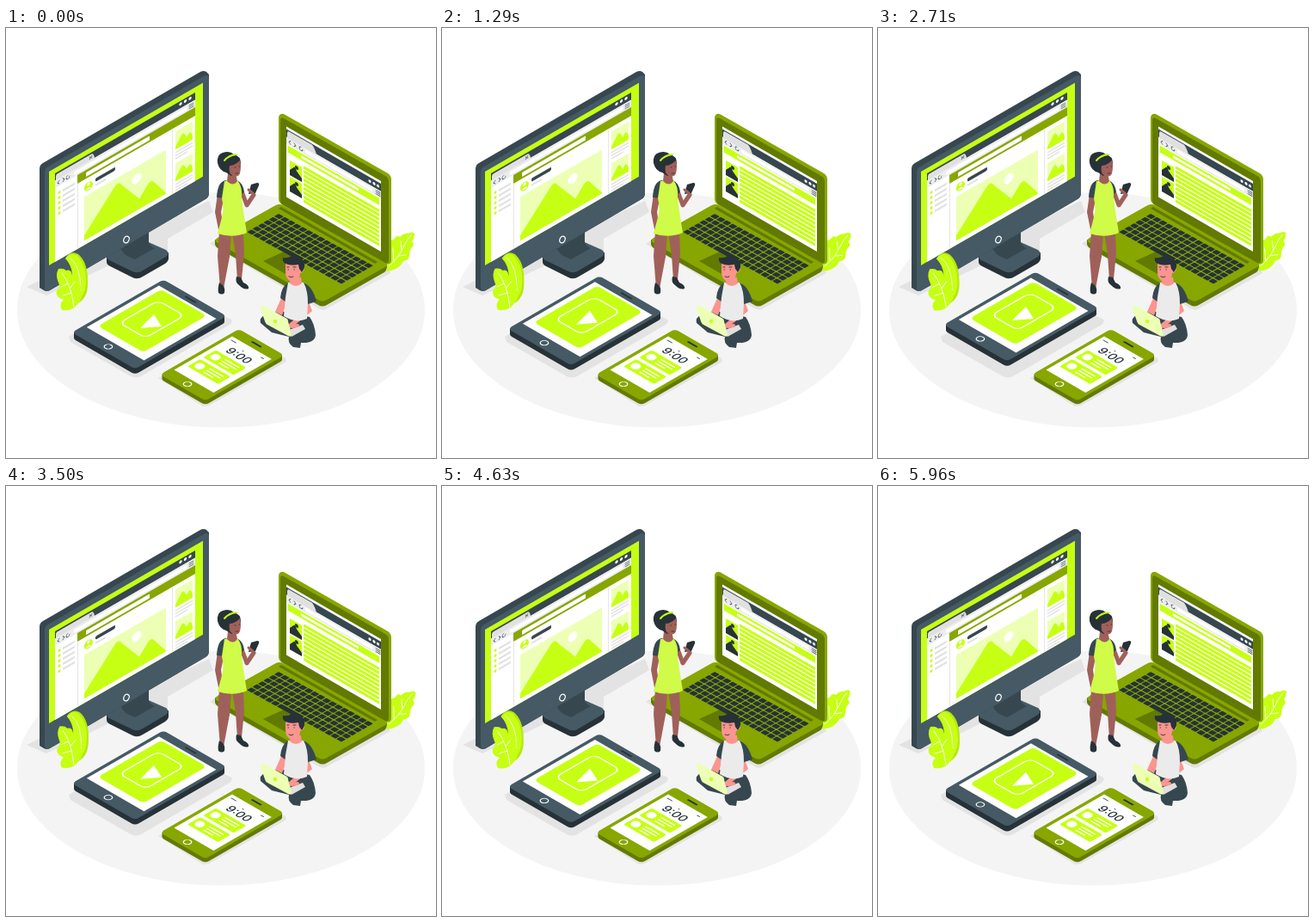
An HTML page that plays this animation: 500 by 500 pixels, repeating every 6000 ms.

```html
<!DOCTYPE html>
<html lang="en">
<head>
<meta charset="utf-8">
<title>Devices</title>
<style>
html, body { margin: 0; width: 100%; height: 100%; overflow: hidden; background: #fff; }
svg { display: block; width: 100vw; height: 100vh; }
.lime { fill: #c6ff14; }
.leaf { fill: #b5e80c; }
.pale { fill: #edffb4; }
.olive { fill: #87a600; }
.moss { fill: #627a00; }
.slate { fill: #455a64; }
.dark { fill: #37474f; }
.ink { fill: #263238; }
.white { fill: #fff; }
.grey { fill: #e0e0e0; }
.shade { fill: #e3e3e3; }
.brown { fill: #a0605a; }
.skin { fill: #fb958f; }
.line { fill: none; stroke-linecap: round; stroke-linejoin: round; }
text { font: 500 13.5px Inter, Arial, sans-serif; }
</style>
</head>
<body>
<svg viewBox="0 0 500 500">
  <ellipse cx="250" cy="328" rx="237" ry="136.5" fill="#f4f4f4"/>

  <!-- floor shadows -->
  <path class="shade" d="M24 301L44 291L236 201L241 214L188 245V268L158 287L120 276L47 311Z"/>
  <path class="shade" d="M237 251L244 246L372 318L443 280L447 285L372 327Q368 329 363 326Z"/>
  <path class="shade" d="M73 359L180 297L262 339Q264 342 260 345L157 405Q151 408 145 405L75 365Z"/>
  <path class="shade" d="M177 407L270 354L325 384L326 388L236 439L229 440Z"/>

  <!-- monitor -->
  <path class="ink" d="M117 265V272Q117 275 121 277L147 290Q153 293 159 289L185 274Q189 271 189 268V261Z"/>
  <path class="slate" d="M119 262L152 243L186 258Q191 262 186 266L159 282Q153 286 147 283L120 270Q114 266 119 262Z"/>
  <path class="dark" d="M133 250L166 230V249Q167 254 173 256L150 269Q135 264 133 255Z"/>
  <path class="dark" d="M39 164Q39 159 43 157L226 51Q230 49 233 51L236 54V192Q236 197 232 199L51 305Q47 307 44 305L39 302Z"/>
  <path class="slate" d="M45 168Q45 163 49 161L230 56Q236 53 236 59V192Q236 197 232 199L51 305Q45 308 45 301Z"/>
  <g id="monitor" transform="matrix(1 -.577 0 1 50 167)">
    <path class="lime" d="M0 0H179V109H0Z"/>
    <path class="white" d="M7 7H170V109H7Z"/>
    <path class="dark" d="M7 6H170V14.500H7Z"/>
    <path class="grey" d="M8 15V10Q8 8 10 8H49Q52 8 53 15Z"/>
    <path fill="#ededed" d="M7 14.500H170V23H7Z"/>
    <path class="white" d="M29 17H160V21H29Z"/>
    <path class="line" stroke="#455a64" stroke-width=".8" d="M12 17l-2 2l2 2M16 17l2 2l-2 2M22 17a2 2 0 1 0 2 2M47 10l3 3m0-3l-3 3M163 17h5M163 19h5M163 21h5"/>
    <g class="white"><circle cx="153" cy="9.500" r="1.700"/><circle cx="158.500" cy="9.500" r="1.700"/><circle cx="164" cy="9.500" r="1.700"/></g>
    <path class="olive" d="M33 23H170V33H33Z"/>
    <path class="grey" d="M33 33h.8V109h-.8ZM143 33h.8V109h-.8Z"/>
    <rect class="white" x="43" y="26" width="74" height="5" rx="1"/>
    <circle class="lime" cx="46" cy="43.500" r="5"/>
    <path class="white" d="M43 47Q46 42 49 47ZM44.300 41a1.700 1.700 0 1 1 3.400 0a1.700 1.700 0 1 1-3.400 0"/>
    <rect class="dark" x="54" y="39" width="23" height="4" rx="1.500"/>
    <path class="grey" d="M54 46H66V48H54Z"/>
    <rect class="pale" x="41" y="53" width="95" height="51"/>
    <circle class="white" cx="102" cy="67" r="5.500"/>
    <path class="lime" d="M41 104V98L76 62Q81 57 85 65L105 92L115 81Q119 77 123 84L136 103V104Z"/>
  </g>
  <ellipse cx="140" cy="246" rx="3" ry="4" fill="none" stroke="#fff" stroke-width="1.200" transform="rotate(25 140 246)"/>

  <!-- right plant -->
  <g id="plantR">
    <path class="lime" d="M443 283V258Q445 246 451 246Q454 240 458 243Q463 238 468 239Q472 236 475 239Q475 245 472 248Q476 252 471 256Q469 260 469 265Q469 270 462 271Q458 281 443 283Z"/>
    <path class="line" stroke="#fff" stroke-width=".9" d="M445 277Q456 268 462 255Q466 246 471 241M451 271L450 256M456 265L465 264M460 258L459 248"/>
  </g>

  <!-- laptop -->
  <path class="moss" d="M243 246V252Q244 255 248 257L363 322Q368 325 373 322L440 284Q443 282 443 276Z"/>
  <path class="olive" d="M246 244L312 207Q318 203 324 207L442 272Q445 275 441 278L373 316Q368 319 363 316L246 250Q241 247 246 244Z"/>
  <path class="moss" d="M317 210L320 208L432 272L429 274Z"/>
  <path class="moss" d="M323 260L348 273L325 286L299 271Z"/>
  <g id="keys" class="ink" transform="matrix(.866 .475 -.866 .5 317 216)"></g>
  <path class="olive" d="M317 104Q318 99 323 100L444 169Q448 172 448 176V270Q448 275 443 274L322 206Q317 203 317 199Z"/>
  <path class="moss" d="M319 107Q319 103 323 105L441 172Q445 174 445 179V270Q445 275 441 273L323 206Q319 204 319 200Z"/>
  <g id="laptop" transform="matrix(1 .577 0 1 318 101)">
    <path class="white" d="M8 9H118V91H8Z"/>
    <path class="dark" d="M8 12H118V21H8Z"/>
    <path class="grey" d="M9 21V16Q9 13 12 13H37Q40 13 43 21Z"/>
    <path fill="#ededed" d="M8 21H118V29H8Z"/>
    <path class="white" d="M30 23H108V27H30Z"/>
    <path class="line" stroke="#455a64" stroke-width=".8" d="M13 23l-2 2l2 2M17 23l2 2l-2 2M25 23a2 2 0 1 0 2 2M112 23h5M112 25h5M112 27h5"/>
    <g class="white"><circle cx="105" cy="16.500" r="1.600"/><circle cx="110" cy="16.500" r="1.600"/><circle cx="114.500" cy="16.500" r="1.600"/></g>
    <path class="lime" d="M10 30H116V38H10Z"/>
    <path class="white" d="M25 32.500H92V35.500H25Z"/>
  </g>

  <!-- left plant -->
  <g id="plantL">
    <path class="leaf" d="M82 321Q96 315 95 294Q95 272 84 263Q75 258 69 268Q77 276 78 289Z"/>
    <path class="lime" d="M80 318Q93 313 93 294Q93 275 83 265Q76 260 69 268Q76 275 77 286Q75 294 80 301Z"/>
    <path class="line" stroke="#fff" stroke-width=".8" d="M74 267Q87 276 87 305"/>
    <path class="lime" d="M65 328Q61 321 67 316Q57 313 59 305Q64 302 61 296Q57 287 61 280Q67 279 70 282Q76 280 77 288Q84 288 83 296Q89 298 86 306Q91 313 84 320Q78 330 65 328Z"/>
    <path class="line" stroke="#fff" stroke-width=".9" d="M65 285Q76 299 79 324M72 297L64 301M76 308L66 311M74 303L80 295"/>
  </g>

  <!-- tablet -->
  <g id="tablet">
    <rect class="ink" width="123" height="85" rx="5" transform="matrix(.866 -.5 .866 .5 76.500 360.500)"/>
    <path class="ink" d="M79 354V360.500L254 341.500V335Z"/>
    <g transform="matrix(.866 -.5 .866 .5 76.500 354)">
      <rect class="slate" width="123" height="85" rx="5"/>
      <rect class="white" x="16" y="4" width="97" height="77"/>
      <rect class="lime" x="25" y="10" width="85" height="61" rx="5"/>
      <rect x="43" y="21" width="52" height="35" rx="7" fill="none" stroke="#fff" stroke-width="1.500"/>
      <circle cx="8" cy="41" r="3.800" fill="none" stroke="#fff" stroke-width="1.200"/>
      <path class="line" stroke="#263238" stroke-width="1.800" d="M118 35V48"/>
    </g>
    <path class="white" d="M156 349L172 333L181 347Z"/>
  </g>

  <!-- phone -->
  <rect class="moss" width="106" height="61" rx="5" transform="matrix(.866 -.5 .866 .5 179 408)"/>
  <path class="moss" d="M181.500 403V408L321 385.500V380.500Z"/>
  <g id="phone" transform="matrix(.866 -.5 .866 .5 179 403)">
    <rect class="olive" width="106" height="61" rx="5"/>
    <rect class="white" x="15" y="4" width="78" height="53"/>
    <circle cx="7.500" cy="29.500" r="3.800" fill="none" stroke="#fff" stroke-width="1.200"/>
    <path class="line" stroke="#263238" stroke-width="2.200" d="M100 24V35"/>
    <path class="line" stroke="#455a64" stroke-width="1.200" d="M88 8V14M88 48V51M83 28V29"/>
  </g>
  <text class="ink" text-anchor="middle" y="4.700" transform="matrix(.866 .5 -.866 .5 271 381)">9:00</text>

  <!-- standing woman -->
  <path class="brown" d="M248 236L246 265L249 303H253L260 266L262 240ZM263 238L267 264L269 293L274 292L277 262L276 238Z"/>
  <path class="ink" d="M248 296Q246 303 247 308Q251 311 254 308Q255 302 252 299ZM268 289Q266 296 271 299Q277 305 282 303Q283 299 276 296L273 290Z"/>
  <path class="brown" d="M246 193L243 214L247 234Q252 240 257 236L252 228L250 214L254 194Z"/>
  <path class="line" stroke="#a0605a" stroke-width="5" d="M273 187L280 206L288 194"/>
  <path class="dark" d="M256 177Q246 178 245 197L255 198L259 180ZM268 177Q276 180 277 191L270 196Z"/>
  <path fill="#d0fb48" d="M254 178L269 177Q275 184 274 197Q275 208 280 238Q264 245 246 239L251 220Q254 211 251 198Z"/>
  <path class="brown" d="M258 169H267L269 178Q264 185 257 178Z"/>
  <path class="ink" d="M265 147Q260 142 252 145Q245 147 246 157Q248 166 256 168L262 172Q272 168 273 157Q273 149 265 147Z"/>
  <path class="brown" d="M260 160Q266 160 272 154Q274 161 272 169Q270 174 264 172Q258 169 260 160Z"/>
  <path class="line" stroke="#c6ff14" stroke-width="2" d="M254 154Q259 148 268 147"/>
  <path class="line" stroke="#263238" stroke-width=".8" d="M266 162h1M271 161h.5M267 169h3"/>
  <path class="ink" d="M285 182L292 180Q295 180 294 183L290 192L282 193Z"/>
  <path class="line" stroke="#a0605a" stroke-width="3" d="M282 188L287 192L288 195"/>

  <!-- sitting man -->
  <path class="dark" d="M302 333Q294 337 296 343L309 354L329 359Q327 366 334 371L342 372L343 366Q359 367 360 357Q359 344 353 336L319 329Z"/>
  <path class="skin" d="M321 312L313 330L321 334L327 318ZM350 313L356 329L335 346L330 350L328 345L346 330Z"/>
  <path class="dark" d="M328 296Q320 301 319 314L326 319L332 301ZM345 296Q356 299 361 318L348 322L342 303Z"/>
  <path fill="#ebebeb" d="M328 296L346 296Q351 305 351 320L350 338Q337 344 323 335L325 313Z"/>
  <path class="skin" d="M331 290H343L344 297Q337 303 330 297Z"/>
  <path class="skin" d="M325 274H342L347 281Q345 285 342 285Q342 294 333 295Q325 293 325 284Z"/>
  <path class="ink" d="M322 267Q328 268 332 265Q344 265 346 272Q349 277 344 284L341 280L340 275Q331 277 325 274Q321 272 322 267Z"/>
  <path class="line" stroke="#263238" stroke-width=".9" d="M328 281h.5M335 281h.5M327 278h2M334 278h3M329 289q3 2 5 0"/>
  <path class="grey" d="M329 351L345 345L348 350L332 359Z"/>
  <path class="pale" d="M300 323L325 337Q328 338 328 341L332 357Q332 360 328 358L304 345Q302 344 301 341L296 326Q296 321 300 323Z"/>
  <circle class="lime" cx="313" cy="341" r="2.200"/>
  <path class="line" stroke="#fb958f" stroke-width="4" d="M333 347L339 346"/>
</svg>
<script>
const $ = id => document.getElementById(id);
const add = (id, html) => $(id).insertAdjacentHTML('beforeend', html);
const rect = (cls, x, y, w, h, r = 0) =>
  `<rect class="${cls}" x="${x}" y="${y}" width="${w}" height="${h}" rx="${r}"/>`;

// sidebar list
for (let i = 0; i < 5; i++) {
  const y = 30 + i * 6;
  add('monitor', `<circle class="lime" cx="12" cy="${y + 1}" r="1.6"/>` + rect('grey', 16, y, 14, 2.4));
}

// side thumbnails with captions
for (const y of [38, 75]) {
  add('monitor', rect('pale', 147, y, 20, 21) +
    `<path class="lime" d="M147 ${y + 21}v-3l7-10q2-2 4 2l2 4l3-3q2-1 4 6v4z"/>`);
  for (let i = 0; i < 3; i++) add('monitor', rect('grey', 147, y + 24 + i * 3.5, i < 2 ? 20 : 14, 1.5));
}

// article on the laptop
for (const y of [46, 65]) {
  add('laptop', rect('lime', 12, y, 14, 17) +
    `<path class="ink" d="M12 ${y + 17}v-6l5-6q2-1 3 3l6 5v4z"/><circle class="ink" cx="20" cy="${y + 4}" r="2"/>`);
}
for (let i = 0; i < 9; i++) add('laptop', rect('lime', 28, 43 + i * 4.9, 88, 3.5));

// keyboard
for (let row = 0; row < 6; row++) {
  for (let x = 0; x < 128; x += 8) {
    if (row === 5 && x > 32 && x < 72) continue;
    add('keys', rect('ink', x, row * 7.3, 6.8, 6, 1));
  }
}
add('keys', rect('ink', 40, 36.5, 31, 6, 1));

// phone notifications
for (const u of [49, 28]) {
  add('phone', rect('lime', u, 9, 17, 41, 2) + `<circle class="white" cx="${u + 8.5}" cy="17" r="5"/>`);
  for (let i = 0; i < 3; i++) add('phone', rect('white', u + 3.5 + i * 4, 26, 1.6, i ? 19 : 13));
}

// triangle wave: 0, 1, 0, -1 over one period
const wave = p => p < .25 ? 4 * p : p < .75 ? 2 - 4 * p : 4 * p - 4;

function draw(now) {
  const t = now % 6000 / 6000;
  const lift = 10 * (1 - Math.abs(1 - 2 * t));
  const sway = 3 * wave(t * 2 % 1);
  $('tablet').setAttribute('transform', `translate(0 ${-lift})`);
  $('plantL').setAttribute('transform', `rotate(${sway} 78 320)`);
  $('plantR').setAttribute('transform', `rotate(${sway} 446 278)`);
  requestAnimationFrame(draw);
}
draw(0);
</script>
</body>
</html>
```
